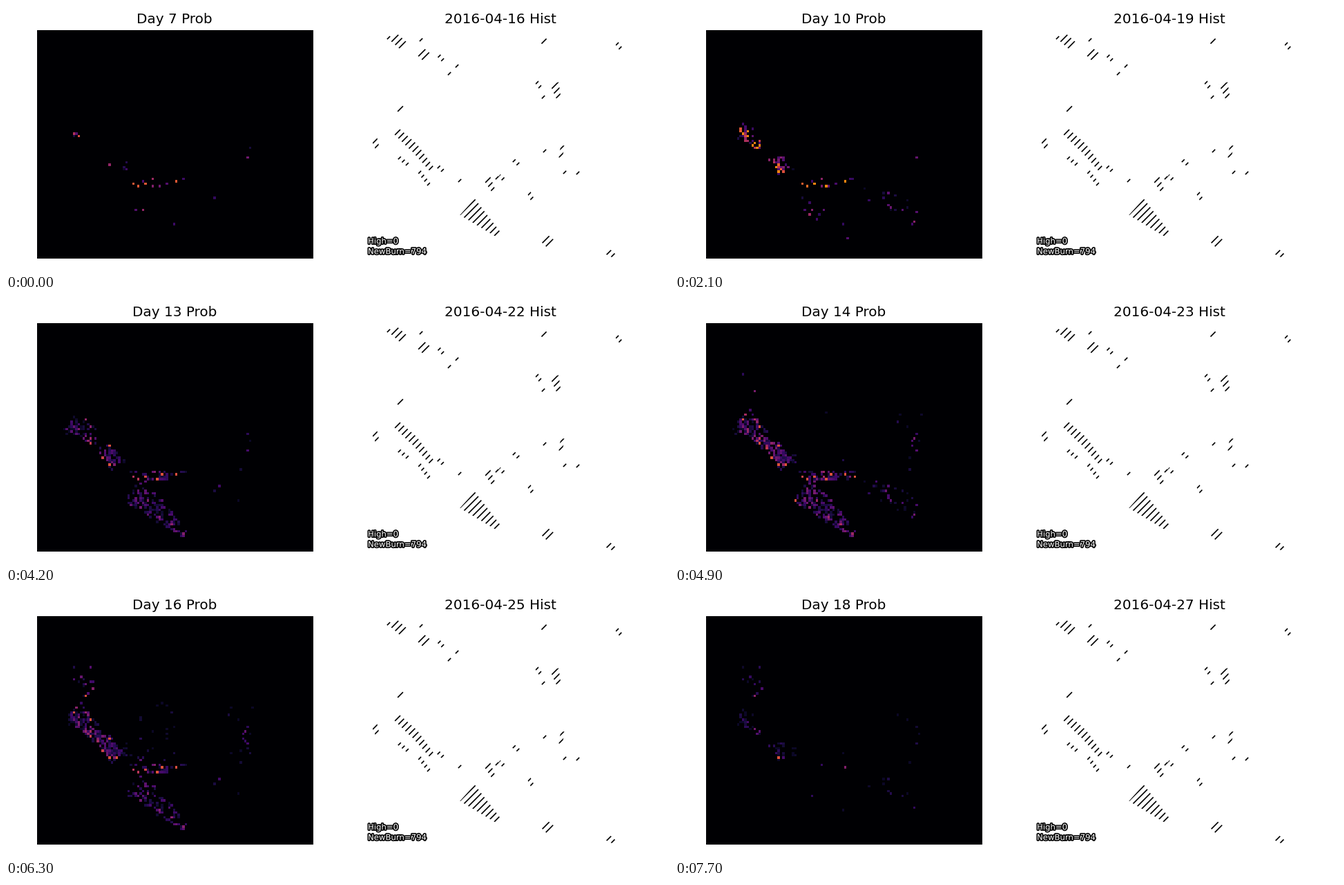
A matplotlib script for the animation above (8000 ms loop, 960 by 384 pixels).

```python
import numpy as np
import matplotlib.pyplot as plt
from matplotlib import patheffects
from matplotlib.animation import FuncAnimation
from matplotlib.patches import PathPatch
from matplotlib.path import Path

W, H, DPI = 960, 384, 120
ROWS, COLS = 96, 116
LEFT, RIGHT, TOP, PW, PH = 45, 516, 35, 400, 331
CELL = PW / COLS
FIRST = 7
STEP = 7  # ticks of 100 ms per day

plt.rcParams["font.family"] = "DejaVu Sans"
plt.rcParams["hatch.linewidth"] = 1.0


def band(x0, y0, x1, y1, w0, w1):
    """Strip between two points whose width runs from w0 to w1."""
    a, b = np.array([x0, y0]), np.array([x1, y1])
    side = np.array([y0 - y1, x1 - x0]) / np.hypot(*(b - a)) / 2
    corners = [a + side * w0, b + side * w1, b - side * w1, a - side * w0]
    return Path(corners + corners[:1], closed=True)


# ---- fire probability -------------------------------------------------
KEY_DAYS = [7, 9, 11, 13, 15, 16, 18]
DAY_LEVEL = [.3, .3, .24, .2, .27, .2, .12]
CORES = np.array([(101, 186), (116, 205), (150, 232)])

# area, relative strength, burning cells on the key days
REGIONS = [
    ((96, 164, 163, 240, 30, 24), 1.0, (5, 62, 36, 75, 175, 130, 36)),
    ((66, 178, 158, 178, 44, 44), .6, (4, 14, 5, 34, 25, 20, 14)),
    ((184, 275, 260, 342, 44, 12), .95, (3, 6, 14, 105, 140, 75, 2)),
    ((180, 256, 263, 256, 14, 14), 1.0, (10, 14, 10, 32, 60, 30, 2)),
    ((268, 264, 356, 306, 20, 32), .6, (1, 20, 12, 3, 55, 3, 9)),
    ((338, 155, 338, 250, 40, 40), .6, (2, 1, 1, 4, 20, 16, 6)),
    ((210, 158, 210, 246, 80, 80), .5, (4, 2, 0, 2, 12, 26, 6)),
    ((113, 104, 113, 152, 30, 30), .7, (0, 0, 0, 0, 5, 15, 12)),
]

yy, xx = np.mgrid[:ROWS, :COLS]
centres = np.column_stack([LEFT + (xx.ravel() + .5) * CELL,
                           TOP + (yy.ravel() + .5) * CELL])
rng = np.random.default_rng(16)
core_dist = np.linalg.norm(centres[:, None] - CORES, axis=2).min(axis=1)
ignition = rng.random(ROWS * COLS) + np.minimum(core_dist, 30) / 30
vigour = .4 + rng.exponential(.6, ROWS * COLS)
order = []
for area, _, _ in REGIONS:
    cells = np.flatnonzero(band(*area).contains_points(centres))
    order.append(cells[np.argsort(ignition[cells])])


def probability(day):
    level = np.interp(day, KEY_DAYS, DAY_LEVEL)
    flare = 2.2 * np.exp(-((day - 9) / 1.2) ** 2)
    heat = level * vigour * (1 + flare * np.exp(-(core_dist / 9) ** 2))
    grid = np.zeros(ROWS * COLS)
    for cells, (_, strength, counts) in zip(order, REGIONS):
        lit = cells[:round(np.interp(day, KEY_DAYS, counts))]
        grid[lit] = np.clip(strength * heat[lit], .07, .6 + .12 * flare)
    return grid.reshape(ROWS, COLS)


# ---- burn scars, cut into strokes by the hatch ------------------------
SCARS = [
    (560, 44, 575, 57, 14, 14), (599, 65, 609, 74, 14, 15),
    (776, 47, 782, 55, 10, 10), (794, 112, 800, 133, 13, 7),
    (568, 146, 574, 152, 11, 11), (533, 192, 538, 207, 9, 6),
    (566, 182, 592, 206, 11, 13), (592, 206, 617, 237, 12, 8),
    (696, 249, 706, 268, 11, 6), (668, 291, 715, 333, 32, 8),
    (780, 337, 788, 344, 14, 15), (870, 355, 882, 363, 10, 6),
]
TRAILS = [
    (625, 70, 634, 80), (883, 52, 891, 63), (767, 108, 775, 120),
    (624, 231, 634, 240), (567, 218, 582, 230), (597, 238, 614, 261),
    (733, 222, 744, 231), (757, 270, 763, 282), (806, 202, 803, 220),
    (714, 246, 724, 254),
]
FLECKS = [(554, 46), (601, 49), (653, 87), (642, 98), (778, 132), (657, 253),
          (711, 249), (780, 210), (809, 241), (828, 242)]

shapes = [band(*s) for s in SCARS]
shapes += [band(*t, 5.5, 5.5) for t in TRAILS]
shapes += [band(x - 2, y - 2, x + 2, y + 2, 6, 6) for x, y in FLECKS]

# ---- stage ------------------------------------------------------------
fig = plt.figure(figsize=(W / DPI, H / DPI), dpi=DPI, facecolor="white")


def panel(x):
    ax = fig.add_axes([x / W, 1 - (TOP + PH) / H, PW / W, PH / H])
    ax.axis("off")
    return ax


prob_ax, hist_ax = panel(LEFT), panel(RIGHT)
maps = {day: probability(day) for day in range(FIRST, FIRST + 12)}
image = prob_ax.imshow(maps[FIRST], cmap="inferno", vmin=0, vmax=1,
                       aspect="auto", interpolation="nearest")
prob_title = prob_ax.set_title("", x=.5 - 1 / PW)

hist_ax.set_xlim(RIGHT, RIGHT + PW)
hist_ax.set_ylim(TOP + PH, TOP)
hist_ax.add_patch(PathPatch(Path.make_compound_path(*shapes), fc="none",
                            ec="black", lw=0, hatch="////"))
hist_title = hist_ax.set_title("")


def label(y, text):
    outline = [patheffects.withStroke(linewidth=2, foreground="black")]
    return hist_ax.text(.02, y, text, color="white", fontsize=7,
                        transform=hist_ax.transAxes, path_effects=outline)


high = label(.065, "")
label(.02, "NewBurn=794")


def update(tick):
    day = FIRST + tick // STEP
    image.set_data(maps[day])
    prob_title.set_text(f"Day {day} Prob")
    hist_title.set_text(f"2016-04-{day + 9:02d} Hist")
    high.set_text(f"High={10 if day == 9 else 0}")
    return image, prob_title, hist_title, high


anim = FuncAnimation(fig, update, frames=80, interval=100, repeat=True,
                     repeat_delay=0, blit=False)
plt.show()
```
